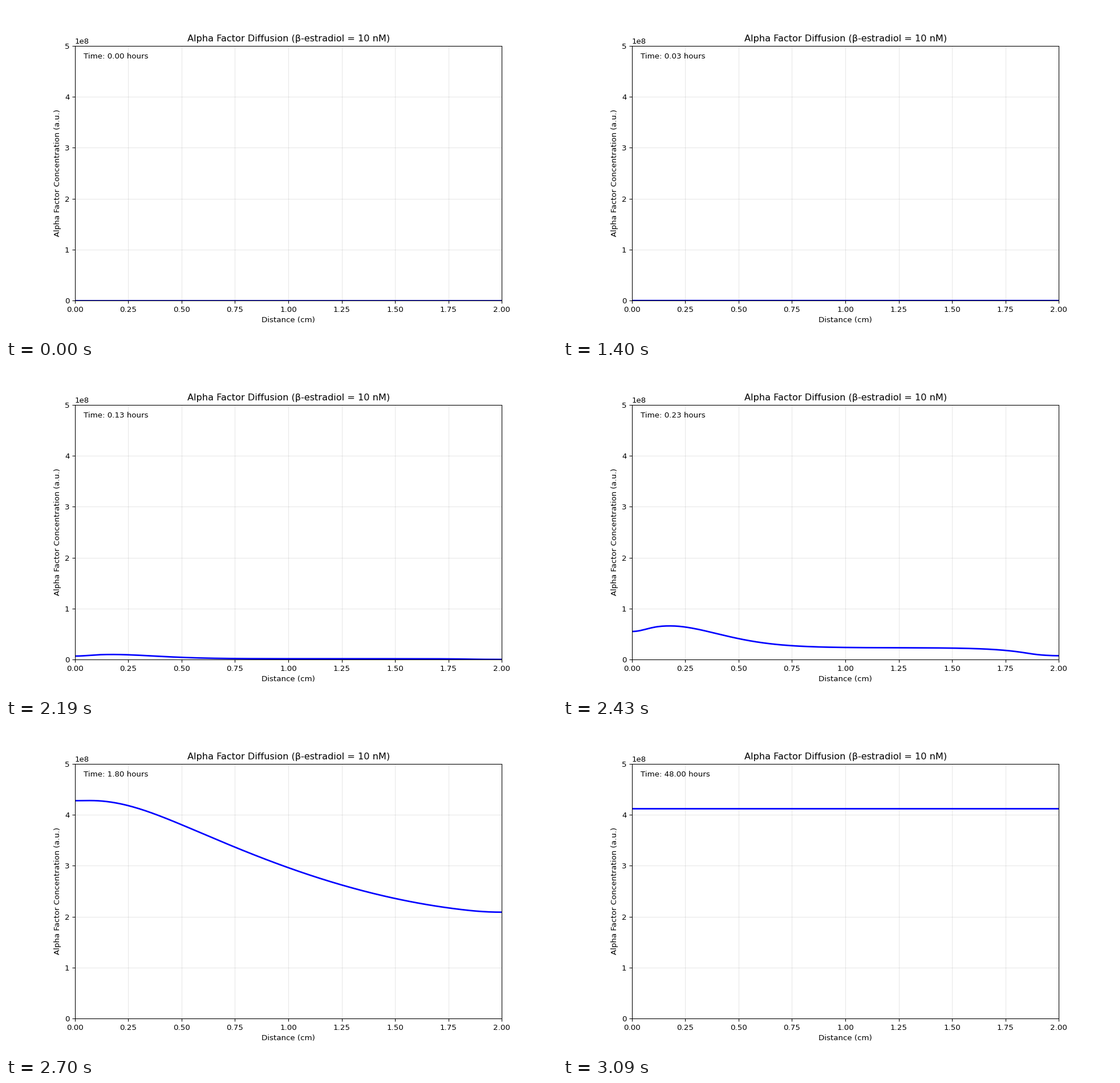
A matplotlib script for the animation above (3120 ms loop, 966x580 px).

```python
import numpy as np
import matplotlib.pyplot as plt
from matplotlib.animation import FuncAnimation

plt.rcParams["font.family"] = "DejaVu Sans"

WIDTH, HEIGHT, DPI = 966, 580, 96.6
INTERVAL = 30
UNIT = 1e8
LENGTH = 2.0      # cm
DIFF = 0.35       # cm^2 / h
RATE = 0.766      # approach to saturation, 1 / h
FINAL = 4.12      # uniform level reached at the end
SHARE = 0.40      # part produced by the dense patch on the left

# Solver stages: (steps, end time in hours, growth of each step)
STAGES = [(25, 0.0051, 1.05), (8, 0.0151, 1.03), (19, 0.0451, 1.03),
          (21, 0.13, 1.05), (8, 0.23, 1.07), (9, 1.8, 1.465), (13, 48, 1.26)]


def solver_times():
    times = [0.0]
    for n, end, growth in STAGES:
        start = times[-1]
        part = (growth ** np.arange(1, n + 1) - 1) / (growth ** n - 1)
        times.extend(start + (end - start) * part)
    return times


k = np.arange(40)
mu = DIFF * (k * np.pi / LENGTH) ** 2


def basis(pos):
    return np.cos(np.outer(pos, k) * np.pi / LENGTH)


def cosine_modes(profile, pos):
    coef = 2 * (profile / profile.mean()) @ basis(pos) / len(pos)
    coef[0] = 1
    return coef


# Cells fill the strip except for a gap at each wall
cells = (np.arange(2000) + 0.5) * LENGTH / 2000
lawn = ((cells > 0.06) & (cells < 1.85)).astype(float)
patch = lawn * np.exp(-((cells - 0.1) / 0.3) ** 2)
lawn_modes = cosine_modes(lawn, cells)
patch_modes = cosine_modes(patch, cells)


def produced(t, lag, order):
    """Saturating output that starts after a soft lag."""
    active = t ** (order + 1) / (t ** order + lag ** order)
    return FINAL * (1 - np.exp(-RATE * active))


x = np.linspace(0, LENGTH, 200)
B = basis(x)
ease = 1 - (1 - np.linspace(0, 1, 801)) ** 2


def concentration(t):
    """Sum what each past moment produced, diffused up to time t."""
    u = t * ease
    age = t - (u[1:] + u[:-1]) / 2
    fade = np.exp(-np.outer(age, mu))
    from_patch = np.diff(produced(u, 0.271, 2.84)) @ fade
    from_lawn = np.diff(produced(u, 0.2305, 4.81)) @ fade
    return B @ (SHARE * patch_modes * from_patch
                + (1 - SHARE) * lawn_modes * from_lawn)


times = solver_times()

# The tiny surplus keeps the pixel size from rounding down
fig, ax = plt.subplots(figsize=((WIDTH + 1e-6) / DPI, (HEIGHT + 1e-6) / DPI),
                       dpi=DPI)
line, = ax.plot(x, np.zeros_like(x), color="blue", lw=2)
label = ax.text(0.02, 0.95, "", transform=ax.transAxes)
ax.set_xlim(0, LENGTH)
ax.set_ylim(0, 5 * UNIT)
ax.set_xlabel("Distance (cm)")
ax.set_ylabel("Alpha Factor Concentration (a.u.)")
ax.set_title("Alpha Factor Diffusion (β-estradiol = 10 nM)")
ax.grid(True, alpha=0.3)


def update(i):
    t = times[i]
    line.set_ydata(concentration(t) * UNIT)
    label.set_text(f"Time: {t:.2f} hours")
    return line, label


anim = FuncAnimation(fig, update, frames=len(times), interval=INTERVAL,
                     repeat=True, repeat_delay=0)
plt.show()
```
